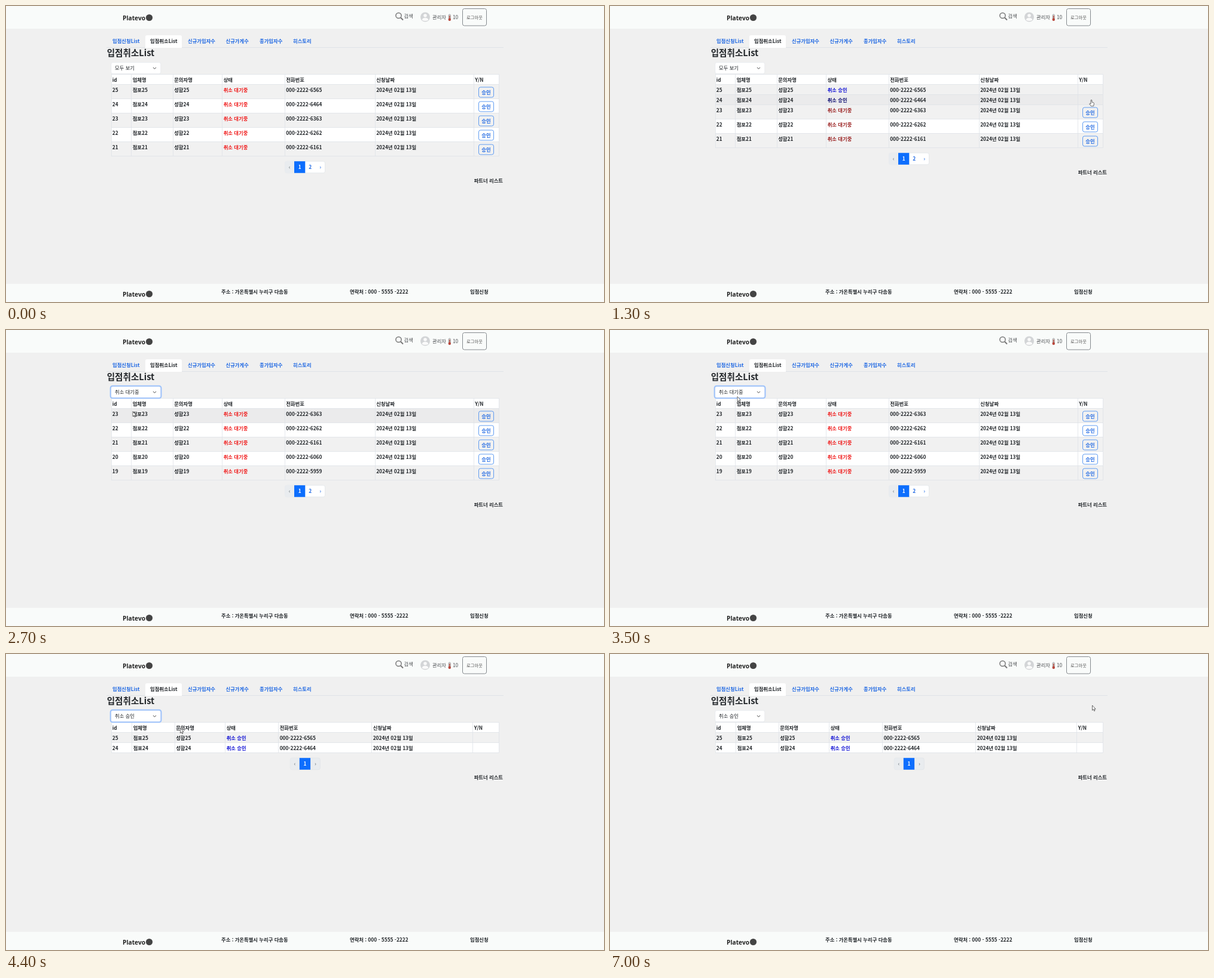
An HTML page that plays this animation: 1000x496 px, repeating every 7100 ms.

```html
<!DOCTYPE html>
<html lang="ko">
<head>
<meta charset="utf-8">
<title>입점취소List</title>
<style>
  html, body { margin: 0; width: 100%; height: 100%; overflow: hidden; background: #f0f0f0; }
  svg { display: block; width: 100%; height: 100%; }
  text { font: 700 8.33px "Noto Sans CJK KR", "Noto Sans CJK", "Noto Sans", sans-serif; fill: #212529; white-space: pre; }
  .title { font-size: 14.58px; }
  .logo { font: 700 10.2px "Noto Sans", sans-serif; fill: #222; }
  .nav { font-weight: 500; fill: #4c4f52; }
  .small { font-weight: 400; font-size: 7.3px; fill: #555; }
  .link { fill: #1f68e3; }
  .select { font-weight: 500; }
  .mid { text-anchor: middle; }
  .end { text-anchor: end; }
  .arrow { font: 400 8.33px "Noto Sans", sans-serif; text-anchor: middle; }
</style>
</head>
<body>
<svg viewBox="0 0 1000 496" preserveAspectRatio="none"><g id="page"></g><g id="live"></g></svg>
<script>
const LOOP = 7100, TICK = 100;
const TABLE_TOP = 114.5, LEFT = 176, RIGHT = 824.5;
const LINE = '#dfe3e7', BLUE = '#0d6efd';
const HEADINGS = ['id', '업체명', '문의자명', '상태', '전화번호', '신청날짜', 'Y/N'];
const COLUMNS = {
  all: [176, 209.5, 279, 361.5, 466, 617, 782],
  approved: [176, 210.5, 282, 366.5, 455.5, 611.5, 780.5]
};

// Pointer path: time, x, y, hand?
const POINTER = [
  [100, 806, 145, 1], [300, 806, 145, 1], [800, 811, 144, 1], [900, 812.5, 143.5, 0],
  [1000, 811, 147, 0], [1100, 808, 153, 1], [1200, 805, 157, 1], [1300, 805, 157, 1],
  [1400, 752, 152, 0], [1600, 468, 128, 0], [1800, 214, 104, 0], [2100, 214, 114, 0],
  [2600, 214, 114, 0], [2700, 212, 136.5, 0], [2800, 212, 136.5, 0], [3000, 212, 117, 0],
  [3200, 213, 104, 0], [3600, 213, 114, 0], [3900, 213, 114, 0], [4000, 211, 147, 0],
  [4200, 217, 141, 0], [4700, 403, 99, 0], [5200, 750.5, 81, 0], [5500, 870, 30, 0],
  [5800, 888, 3, 0], [6900, 888, 3, 0], [7000, 806.5, 86, 0]
];

const text = (x, y, s, cls = '', fill) =>
  `<text x="${x}" y="${y}" class="${cls}"${fill ? ` style="fill:${fill}"` : ''}>${s}</text>`;
const rect = (x, y, w, h, fill, extra = '') =>
  `<rect x="${x}" y="${y}" width="${w}" height="${h}" fill="${fill}" ${extra}/>`;
const path = (d, stroke, width = 1, fill = 'none') =>
  `<path d="${d}" fill="${fill}" stroke="${stroke}" stroke-width="${width}"/>`;
const circle = (x, y, r, fill, extra = '') => `<circle cx="${x}" cy="${y}" r="${r}" fill="${fill}" ${extra}/>`;

function mix(a, b, k) {
  k = Math.max(0, Math.min(1, k));
  return `rgb(${a.map((v, i) => Math.round(v + (b[i] - v) * k))})`;
}

function drawPage() {
  const tabs = [[178, '입점신청List'], [241, '입점취소List'], [304, '신규가입자수'],
    [367.5, '신규가게수'], [424, '총가입자수'], [480, '히스토리']];
  const brand = y => text(195, y, 'Platevo', 'logo') + circle(239.5, y - 4.5, 5.6, '#444');
  return rect(0, 0, 1000, 496, '#f0f0f0') + rect(0, 0, 1000, 38, '#f9fbfa') + rect(0, 465.5, 1000, 31, '#f9fbfa') +
    brand(24) + brand(487) +
    circle(656.5, 16, 4.6, 'none', 'stroke="#777" stroke-width="1.5"') + path('M660 19.5l4 4', '#777', 1.9) +
    text(665.5, 20.3, '검색', 'nav') +
    circle(701, 18.5, 8, '#d3d5d7') + circle(701, 16, 2.8, '#fafafa') +
    path('M695.8 23.8q0-4 5.2-4t5.2 4q-5.2 2.6-10.4 0z', 'none', 0, '#fafafa') +
    text(713, 22, '관리자', 'nav') +
    rect(740.3, 14, 3, 9, '#eee', 'rx="1.5" stroke="#777" stroke-width=".7"') +
    path('M741.8 16v6', '#b8453a', 1.4) + circle(741.8, 22.8, 2.2, '#b8453a') +
    text(747, 22, '10', 'nav') +
    rect(763.5, 4.5, 40, 28.5, 'none', 'rx="3" stroke="#858a8e"') + text(783.5, 21.6, '로그아웃', 'small mid') +
    path('M168 69.5H832', LINE) + path('M233 70V52q0-3 3-3h55q3 0 3 3v18z', 'none', 0, '#fff') +
    tabs.map(([x, s], i) => text(x, 62.3, s, i === 1 ? '' : 'link')).join('') +
    text(168.7, 84.2, '입점취소List', 'title') +
    text(360, 482.4, '주소 : 가온특별시 누리구 다솜동') +
    text(575, 482.4, '연락처 : 000 - 5555 -2222') + text(776, 482.4, '입점신청');
}

function pointerAt(t) {
  if (t < POINTER[0][0]) return null;
  const i = POINTER.findLastIndex(p => p[0] <= t);
  const a = POINTER[i], b = POINTER[i + 1] || a;
  const k = b === a ? 0 : (t - a[0]) / (b[0] - a[0]);
  return { x: a[1] + (b[1] - a[1]) * k, y: a[2] + (b[2] - a[2]) * k, hand: a[3] };
}

function stateAt(t) {
  const filter = t < 2700 ? 'all' : t < 4000 ? 'waiting' : 'approved';
  const first = filter === 'waiting' ? 23 : 25, count = filter === 'approved' ? 2 : 5;
  const since = { 25: 900, 24: 1300 };
  return {
    filter,
    focus: t < 1900 ? 0 : t < 2000 ? .5 : t < 6000 ? 1 : t < 6100 ? .5 : 0,
    pages: t < 4100 ? 2 : 1,
    red: t < 900 || t >= 2700 ? '#f01818' : t < 1300 ? '#cc2420' : '#9a2020',
    rows: Array.from({ length: count }, (_, i) => {
      const id = first - i, at = filter === 'approved' ? 4000 : since[id];
      return { id, age: t >= at ? t - at : null };
    })
  };
}

function drawSelect({ filter, focus }) {
  const label = { all: '모두 보기', waiting: '취소 대기중', approved: '취소 승인' }[filter];
  const halo = focus ? rect(174.7, 93.7, 84.8, 20.6, 'none', `rx="3.5" stroke="#9dc2fb" stroke-width="2" opacity="${focus}"`) : '';
  return rect(175.8, 94.6, 83, 19, '#fff', `rx="3" stroke="${LINE}" stroke-width=".6"`) + halo +
    text(182, 107.4, label, 'select') + path('M246 102.9l2.5 2.5 2.5-2.5', '#444', 1);
}

function drawButton(y, hot) {
  return rect(790.5, y + 4.5, 25, 17, hot ? BLUE : 'none', 'rx="3" stroke="#4f91f0" stroke-width=".9"') +
    text(803, y + 16.2, '승인', 'mid', hot ? '#fff' : '#1f68e3');
}

function drawTable(state, pointer) {
  const cols = COLUMNS[state.filter === 'approved' ? 'approved' : 'all'];
  const cells = (y, values, fill) => values.map((s, i) =>
    text(cols[i] + (i ? 2.2 : 1.8), y + 12, s, '', i === 3 ? fill : '')).join('');
  let y = TABLE_TOP + 17, lines = `M${LEFT} ${TABLE_TOP}H${RIGHT}M${LEFT} ${y}H${RIGHT}`;
  let out = rect(LEFT, TABLE_TOP, RIGHT - LEFT, 17, '#fff') + cells(TABLE_TOP, HEADINGS);
  state.rows.forEach(({ id, age }, i) => {
    const done = age !== null, h = done ? 17 : 24;
    const over = pointer && pointer.x > LEFT && pointer.x < RIGHT && pointer.y >= y - .5 && pointer.y < y + h;
    const status = done ? mix([12, 12, 112], [18, 18, 212], age / 300) : state.red;
    const number = id + 40;
    out += rect(LEFT, y, RIGHT - LEFT, h, over ? '#ebebec' : i % 2 ? '#fff' : '#f1f1f1') +
      cells(y, [id, `점포${id}`, `성함${id}`, done ? '취소 승인' : '취소 대기중',
        `000-2222-${number}${number}`, '2024년 02월 13일'], status);
    if (!done) out += drawButton(y, over && pointer.hand && pointer.x > 790);
    y += h;
    lines += `M${LEFT} ${y}H${RIGHT}`;
  });
  for (const x of [...cols, RIGHT]) lines += `M${Math.floor(x) + .5} ${TABLE_TOP}V${y}`;
  return { markup: out + path(lines, LINE, .8), bottom: y };
}

function drawPager(pages, bottom) {
  const y = bottom + 8.7, x = pages === 2 ? 466.5 : 475.3, width = pages === 2 ? 67 : 50;
  const base = y + 13.2, last = x + width - 7.8;
  return rect(x, y, width, 19.6, pages === 2 ? '#fff' : '#e9ecef', `rx="3" stroke="${LINE}" stroke-width=".7"`) +
    rect(x, y, 16, 19.6, '#e9ecef', 'rx="3"') + rect(x + 15.5, y, 18.3, 19.6, BLUE) +
    text(x + 7.6, base - .3, '‹', 'arrow', '#6c757d') + text(x + 24.6, base, '1', 'mid', '#fff') +
    (pages === 2 ? text(x + 42.2, base, '2', 'mid link') : '') +
    text(last, base - .3, '›', 'arrow', pages === 2 ? '#1f68e3' : '#6c757d');
}

function drawPointer({ x, y, hand }) {
  const shape = hand
    ? 'M-.9.8q.9-1.2 1.8 0v3.4l2.6.7q1.1.4.9 1.8l-.8 4h-4.2l-2.8-3.8q.5-1.3 2.5.1z'
    : 'M0 0v8.4l1.9-1.7 1.3 2.9 1.3-.6-1.3-2.8h2.5z';
  return `<g transform="translate(${x} ${y})">${path(shape, '#444', .8, '#fff')}</g>`;
}

function drawLive(t) {
  const state = stateAt(t), pointer = pointerAt(t);
  const table = drawTable(state, pointer);
  return table.markup + drawSelect(state) + drawPager(state.pages, table.bottom) +
    text(831, table.bottom + 44.6, '파트너 리스트', 'end') + (pointer ? drawPointer(pointer) : '');
}

const live = document.getElementById('live');
document.getElementById('page').innerHTML = drawPage();
const start = performance.now();
let shown = -1;
function frame() {
  const t = Math.floor((performance.now() - start) % LOOP / TICK) * TICK;
  if (t !== shown) live.innerHTML = drawLive(shown = t);
  requestAnimationFrame(frame);
}
frame();
</script>
</body>
</html>
```
